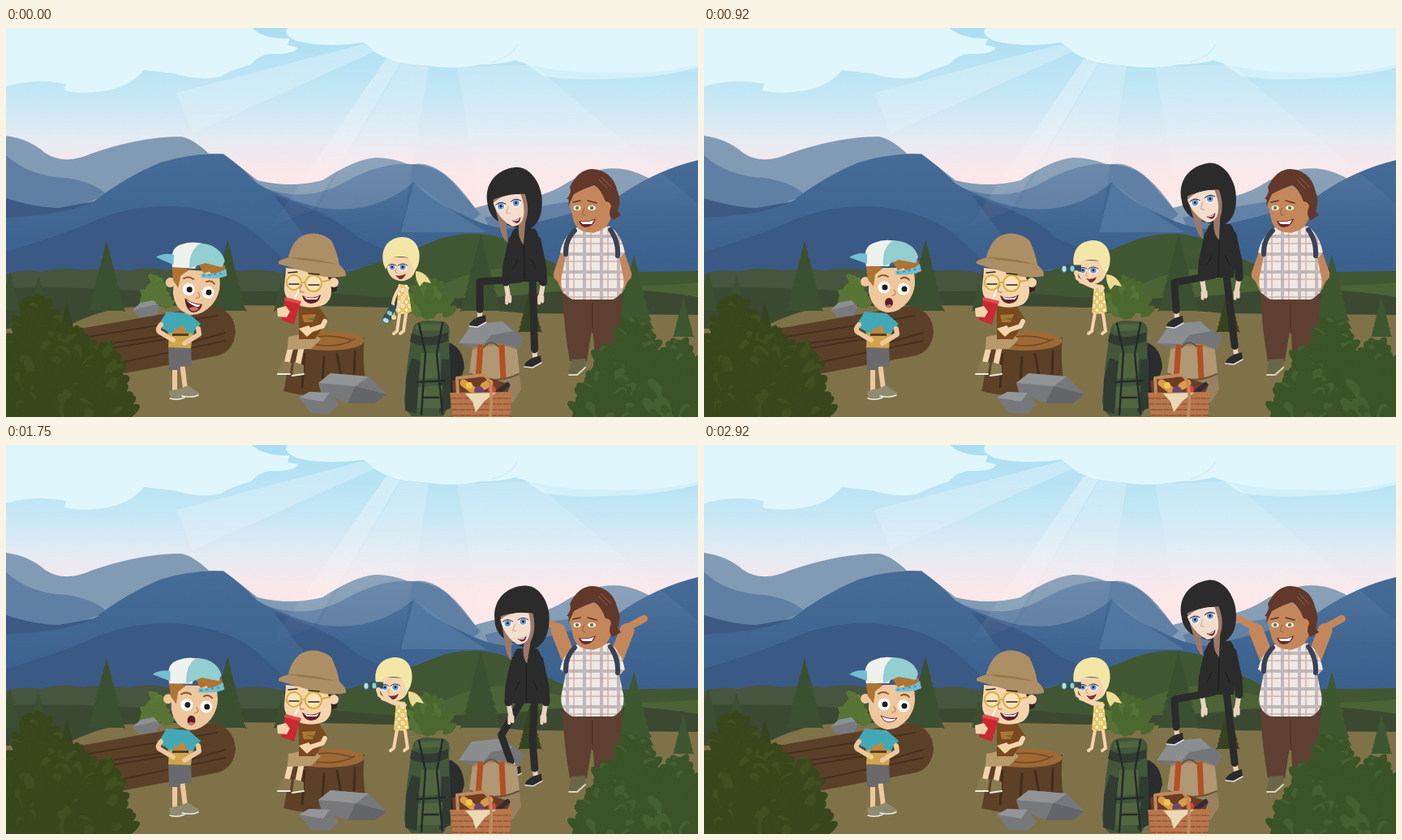
Animation, 853 px wide and 480 px high, one loop 3000 ms. Source, as an HTML page:

```html
<!DOCTYPE html>
<html lang="en">
<head>
<meta charset="utf-8">
<title>Mountain picnic</title>
<style>
html,body{margin:0;width:100%;height:100%;overflow:hidden;background:#7f7249}
svg{display:block;width:100vw;height:100vh}
.l{fill:none;stroke-linecap:round;stroke-linejoin:round}
.skin{fill:#f5d4ad}.sk{stroke:#f5d4ad}
#boy .skin{fill:#efc79d}#boy .sk{stroke:#efc79d}
.pale{fill:#f3ddcd}.pk{stroke:#ecd2c0}
.tan{fill:#c4875c}.tk{stroke:#c4875c}
.black{fill:#2b2b2c}.blk{stroke:#2b2b2c}
.w{fill:#fff}.d{fill:#1d1a1a}
</style>
</head>
<body>
<svg viewBox="0 0 853 480" preserveAspectRatio="none">
<defs>
<linearGradient id="sky" x2="0" y2="1"><stop stop-color="#aadef3"/><stop offset=".3" stop-color="#c4e7f5"/><stop offset=".5" stop-color="#e4ebf4"/><stop offset=".63" stop-color="#f7e8ec"/><stop offset=".72" stop-color="#fee7e7"/></linearGradient>
<linearGradient id="ray" gradientUnits="userSpaceOnUse" x1="0" x2="0" y1="20" y2="250"><stop stop-color="#fff" stop-opacity=".42"/><stop offset=".45" stop-color="#fff" stop-opacity=".2"/><stop offset="1" stop-color="#fff" stop-opacity="0"/></linearGradient>
<linearGradient id="hill" x2="0" y2="1"><stop stop-color="#456c97"/><stop offset="1" stop-color="#3b5f8c"/></linearGradient>
<pattern id="plaid" width="21" height="22" x="684" y="248" patternUnits="userSpaceOnUse">
<path d="M0 0H21V22H0Z" fill="#efe8e4"/><path d="M8 0V22M0 9H21" stroke="#9d8f96" stroke-width="4" opacity=".55"/><path d="M16 0V22M0 18H21" stroke="#c59a94" stroke-width="1.500" opacity=".7"/></pattern>
<pattern id="daisy" width="9" height="10" patternUnits="userSpaceOnUse"><path d="M0 0H9V10H0Z" fill="#e9c660"/><circle cx="3" cy="3" r="2.300" fill="#fff8e4"/><circle cx="7.500" cy="8" r="1.800" fill="#fff8e4"/><circle cx="3" cy="3" r=".8" fill="#c07a35"/></pattern>
<g id="eye"><circle class="w" r="7.500"/><circle class="d" cx="1" r="3.500"/></g>
<g id="blue"><ellipse class="w" rx="5.500" ry="5"/><circle r="4" fill="#6f9bd8"/><circle class="d" r="1.500"/><path d="M-6-2Q0-7 6-2" class="l" stroke="#332b2b"/></g>
<g id="sole"><path class="black" d="M7-8L-3-5Q-14 1-13 6L-3 7 8 1Z"/><path d="M-13 6L-3 7 8 1" class="l" stroke="#e4e1de" stroke-width="1.500"/></g>
</defs>

<path fill="url(#sky)" d="M0 0H853V270H0Z"/>
<path fill="#d2f0fa" d="M640 44L853 36V49Q800 62 760 62 700 66 662 59Z"/>
<path fill="#e0f6fd" d="M0 0H303Q318 14 350 13L347 21 360 24Q356 33 326 32 312 33 302 45 280 51 264 60 240 66 207 56L170 52Q152 74 118 78 92 82 72 77L74 69Q38 61 0 72Z"/>
<path fill="#e0f6fd" d="M347 0H853V45Q810 57 750 55 680 57 628 40 610 45 585 45 548 52 515 46 470 43 453 28L440 18Q395 25 358 16 340 8 347 0Z"/>
<path class="l" stroke="#d0edf8" stroke-width="1.500" d="M600 42Q626 34 630 20"/>

<path fill="#829bb4" d="M0 133Q29 137 48 154 72 170 105 155 165 134 216 134 231 137 250 155H268L310 188Q350 198 390 188 430 162 455 160 477 160 498 169 534 158 578 222L600 216Q660 212 690 192 748 156 798 189L853 220V300H0Z"/>
<path fill="#5f7fa4" d="M0 157Q28 183 75 185 108 190 125 206L60 230H0ZM320 198Q372 216 418 190 462 165 500 168 533 170 550 190L585 230 560 250H390ZM590 234Q650 220 705 213 738 210 760 217L680 255H600Z"/>
<path fill="#3c5a84" d="M0 210Q38 222 65 222L120 212 100 250H0Z"/>
<path fill="url(#hill)" d="M0 234Q80 230 110 213 145 185 190 166 232 153 268 156 288 169 310 192 342 211 388 222 431 228 466 213 487 204 503 190 521 212 560 229 590 245 618 248 706 229 752 210 799 176 853 163V315H0Z"/>
<path fill="#3b5985" d="M0 276Q55 260 100 242 150 218 208 220 268 224 307 253L350 292V310H0ZM330 206Q405 230 433 258L500 290 400 300Z"/>
<g fill="url(#ray)"><path d="M440 20L455 29 230 130 210 80Z" opacity=".7"/><path d="M468 39L488 40 378 225 326 246Z"/><path d="M488 41L521 48 487 255 380 230Z" opacity=".6"/><path d="M556 48L650 45 880 240 592 252Z" opacity=".5"/></g>
<path fill="#7fa3c8" opacity=".25" d="M503 190L545 222 592 252H487Z"/>

<path fill="#46553e" d="M0 304Q20 297 42 301 70 293 95 299 130 295 150 300 170 293 200 299 250 293 288 300 326 296 350 306L425 300 853 307V355H0Z"/>
<path fill="#415733" d="M420 302Q485 281 530 262 572 247 612 259 655 281 700 302L853 300V355H400Z"/>
<path fill="#4b6335" d="M498 340Q585 281 655 303 744 325 853 314V355H498Z"/>
<path fill="#3c4932" d="M0 321Q110 318 230 329 340 319 455 332 590 337 665 326 770 317 853 332V374H0Z"/>
<path fill="#7f7249" d="M0 371H70Q115 346 160 344 300 340 470 345 550 343 640 352L853 354V480H0Z"/>
<g id="trees"></g>

<path fill="#777b7e" d="M156 348L166 339 182 336 190 344 185 355 164 357Z"/><path fill="#8c9092" d="M156 348L166 339 182 336 186 341Z"/>
<path fill="#5b4028" d="M74 374L250 343Q281 345 283 375 281 398 262 404L120 431 80 410Z"/>
<path class="l" stroke="#472f1e" stroke-width="2" d="M95 382L260 355M130 389L214 377M106 399L196 384M135 414L270 386M215 392L270 376"/>

<g id="boy">
<path class="l sk" stroke-width="6" d="M208 414V447M217 414L221 445"/>
<path fill="#8f8a70" d="M201 448L213 445 220 455 212 459Q201 459 201 448ZM213 446L224 441 238 450Q239 454 229 455L217 454Z"/>
<path class="l" stroke="#eee" stroke-width="1.500" d="M202 457Q211 460 220 456M217 454Q229 457 237 453"/>
<path fill="#6a6a6c" d="M200 391L228 392 229 417 215 418 214 422 201 422Z"/>
<path fill="#43a8b5" d="M198 350L225 352 240 365 232 374 230 385H201L199 374 187 368Z"/>
<path fill="#d0a54a" d="M201 376L230 377 228 395 200 394Z"/><path fill="#c38735" d="M207 371H214L218 366 224 377H207Z"/><path fill="#4d4034" d="M205 377H225V380H205Z"/>
<path class="l sk" stroke-width="6" d="M191 366Q186 371 189 375L206 385M237 371L238 378 220 389"/>
<g id="boyHead">
<circle class="skin" cx="199" cy="313" r="6"/>
<path class="skin" d="M203 296H257Q265 319 252 337 240 352 225 351 207 347 203 326Z"/>
<path fill="#ad7433" d="M199 290L221 296 211 304 209 319 202 310ZM230 285L264 287Q268 295 259 301L257 296 250 302 246 296 239 299Z"/>
<path fill="#eef1ed" d="M200 294Q194 270 210 265 224 259 241 264L228 294Z"/>
<path fill="#93ced0" d="M221 294Q219 271 233 262 258 263 264 282L261 290 240 286Z"/>
<path fill="#73bed2" d="M179 283Q190 276 201 279V291ZM236 299Q255 301 266 291L268 300Q257 306 236 304Z"/>
<path d="M238 302L266 297" stroke="#3f95b5" stroke-dasharray="3 4" stroke-width="2"/>
<use href="#eye" x="222" y="320"/><use href="#eye" x="246" y="322"/>
<path class="l" stroke="#8a5a2d" stroke-width="2" d="M215 307Q221 303 227 307M243 309Q249 306 253 311"/>
<path class="l" stroke="#c98f62" stroke-width="1.500" d="M234 323Q239 329 232 330"/>
<g id="mouth"></g>
</g></g>

<g id="sitter">
<path fill="#5c4126" d="M349 386L442 382Q439 405 443 434 421 449 401 446 382 459 342 448 348 425 349 386Z"/>
<path class="l" stroke="#432d1c" stroke-width="3" d="M368 402L365 443M392 406L390 438M408 402L414 435M430 399L429 430"/>
<ellipse cx="396" cy="386" rx="46" ry="12" fill="#9d6936"/><path class="l" stroke="#75481f" stroke-width="1.500" d="M367 384Q399 376 426 385M383 391Q410 395 430 384"/>
<path class="l sk" stroke-width="7" d="M352 390L346 414M365 390L360 414"/>
<path fill="#8b7b51" d="M341 411L352 413 350 426 334 427ZM355 412L367 416 367 426 353 429Z"/><path class="l" stroke="#f0eee0" stroke-width="2" d="M335 427L350 427M353 429L367 427"/>
<path fill="#b99a6c" d="M348 381L378 375 388 384 376 396 347 397Z"/>
<path fill="#79491f" d="M361 344L386 344 397 361 390 370 381 384H361Z"/><path fill="#b27430" d="M365 354L382 353 378 363H367Z"/><path fill="#5e7135" d="M369 358L381 358 378 361Z"/>
<path class="l sk" stroke-width="6" d="M393 362L390 368 371 374"/><path class="skin" d="M361 371L373 367 379 374 371 381Z"/>
<path fill="#35241c" d="M344 298L409 302 408 324 400 327 343 308Z"/><circle class="skin" cx="404" cy="314" r="6"/>
<path class="skin" d="M345 296L395 302 400 316Q404 333 393 341 374 349 357 340 343 336 343 321Z"/>
<path fill="#ad8f66" d="M347 286Q353 260 369 255 386 250 401 262 409 278 411 293Z"/><path fill="#98794f" d="M348 283Q380 282 411 293L409 298Q380 293 348 287Z"/>
<path fill="#ad8f66" d="M336 288Q348 280 361 286L411 292Q420 300 419 306 395 311 370 301L336 291Z"/>
<g fill="#f8e2bc" stroke="#d5b038" stroke-width="2"><circle cx="355" cy="314" r="9"/><circle cx="379" cy="315" r="10"/><path d="M365 314H369M389 313L400 311"/></g>
<path class="l" stroke="#33231c" stroke-width="1.500" d="M349 316H361M373 317H386M348 302L359 301M373 303L386 304"/>
<path class="l" stroke="#c99261" stroke-width="1.500" d="M365 317Q358 326 367 326"/>
<path d="M365 330Q376 336 388 329 386 341 375 340 367 339 365 330Z" fill="#62202a"/><path class="w" d="M367 331Q377 336 386 331L383 335H371Z"/>
<path class="l" stroke="#f5f2ee" stroke-width="2" d="M354 338L361 323"/><path fill="#c92931" d="M344 333L363 338 355 366 339 360Z"/><path fill="#e04a4d" d="M344 332L364 337 363 341 343 336Z"/>
<path class="skin" d="M334 346L345 343 350 350 346 357 335 356Z"/>
</g>
<path fill="#77787b" d="M385 438L400 426 447 430 469 452 455 463 421 463 388 449Z"/><path fill="#929396" d="M385 438L400 426 447 430 431 442Z"/><path fill="#646568" d="M421 463L431 442 469 452 455 463Z"/>
<path fill="#77787b" d="M361 456L374 449 399 450 410 465 399 476 376 475Z"/><path fill="#949598" d="M361 456L374 449 399 450 391 461Z"/>

<g id="girl"></g>

<g id="man">
<g id="arm"><path id="upper" class="l tk" stroke-width="18"/><path id="lower" class="l tk" stroke-width="9"/></g><use href="#arm" transform="translate(1446) scale(-1 1)"/>
<path fill="#5d4031" d="M686 328L760 328Q757 378 750 410H726L723 367 716 411H695Q688 373 686 328Z"/><path class="l" stroke="#4b3227" stroke-width="1.500" d="M723 340V376"/>
<path fill="#6b6648" d="M697 409L714 408Q717 419 704 428L693 428Q694 420 697 409Z"/><path class="l" stroke="#ddd6be" stroke-width="2" d="M694 428H704L714 419"/>
<path class="tan" d="M705 236H741V255L722 263 704 252Z"/>
<path fill="url(#plaid)" d="M704 246L724 253 743 244Q758 253 763 277L756 284 761 308Q764 328 748 335H699Q681 328 685 306L690 282 683 277Q687 256 704 246Z"/>
<path class="l" stroke="#394253" stroke-width="6" d="M701 250Q689 262 690 279M745 249Q755 263 754 281"/>
<path class="tan" d="M696 202Q718 188 746 203L747 230Q742 250 724 252 706 254 700 239L695 219Z"/>
<path fill="#61382a" d="M693 220Q695 209 691 211 698 203 695 196 706 174 723 174 747 176 753 199 759 213 754 226L758 231 748 237Q741 231 746 220 745 214 739 214 733 198 725 194 710 199 700 205Z"/>
<path class="l" stroke="#9a6348" d="M731 187L741 198M734 184L746 196"/>
<g class="w"><ellipse cx="704" cy="222" rx="4.500" ry="3"/><ellipse cx="722" cy="222" rx="5" ry="3"/></g><g fill="#648044"><circle cx="704" cy="222" r="2.300"/><circle cx="722" cy="222" r="2.300"/></g>
<path class="l" stroke="#5b3222" stroke-width="1.500" d="M699 215L708 213M717 213L728 216"/>
<path class="l" stroke="#955b37" d="M713 222Q707 231 714 231"/>
<path d="M706 238Q718 240 727 235 724 246 714 246 708 245 706 238Z" fill="#65262c"/><path class="w" d="M708 239Q718 240 725 237L722 242H711Z"/>
</g>

<path fill="#737679" d="M558 389L574 366 612 362 639 382 632 397 598 403Z"/><path fill="#8b8e91" d="M558 389L574 366 612 362 625 374 598 379 589 390Z"/>
<g id="woman"></g>

<g id="bags">
<path fill="#292d2d" d="M544 388Q563 392 565 419L556 449 544 455Z"/>
<path fill="#42563a" d="M501 375Q501 361 519 361L539 362Q549 365 546 381L548 462 539 479H500Q488 469 492 449 494 411 501 375Z"/>
<path fill="#303b32" d="M500 376Q518 387 545 375V386Q518 398 498 387ZM493 432L500 407 511 411 506 476 492 472ZM537 409H548V469L534 475Z"/>
<path fill="#50653f" d="M505 366L540 365 538 373 505 374ZM512 401H535V431L509 433ZM508 443L538 441 536 469H507Z"/>
<path class="l" stroke="#242b28" stroke-width="2.500" d="M509 365L517 401 512 477M538 364L531 402 538 476M507 437L541 435M514 456H533"/>
<path fill="#99815f" d="M575 394Q603 384 629 395L635 446 625 462 578 459 570 444Z"/><path fill="#b09874" d="M575 397Q605 387 630 397L633 426Q602 440 571 425Z"/>
<path stroke="#b44f24" stroke-width="7" d="M585 391L582 434M611 391L613 434"/><path class="l" stroke="#6a5641" stroke-width="2" d="M589 394Q597 383 607 393M573 427Q602 441 632 427"/>
<path fill="#6d3c25" d="M550 435L589 430 622 440 617 453H552Z"/>
<path class="l" stroke="#dc9c45" stroke-width="9" d="M564 438L576 447M589 442L596 438"/><circle cx="571" cy="441" r="4" fill="#efc74c"/><circle cx="583" cy="448" r="6" fill="#69476d"/><circle cx="599" cy="446" r="5" fill="#cb493b"/><path class="l" stroke="#362b35" stroke-width="6" d="M607 449L618 440"/>
<path fill="#b8774b" d="M547 450L624 449 621 480H551Z"/><path class="l" stroke="#935638" stroke-width="1.500" stroke-dasharray="6 2" d="M549 457H622M549 464H622M551 471H621M551 478H621"/>
<path fill="#ead9b5" d="M566 451L604 450 590 460 579 474 575 461Z"/><path class="l" stroke="#c18a5d" stroke-width="4" d="M557 450L556 432 588 428Q602 432 597 479"/>
</g>
<g id="bushes"></g>
</svg>
<script>
const $ = id => document.getElementById(id);
let seed = 7;
const rnd = () => (seed = seed * 16807 % 2147483647) / 2147483647;
const mix = (a, b, u) => a + (b - a) * u;
const ease = (n, from, to) => {
  const u = Math.min(1, Math.max(0, (n - from) / (to - from)));
  return u * u * (3 - 2 * u);
};
const line = (d, cls, w) => `<path class="l ${cls}" stroke-width="${w}" d="${d}"/>`;
const put = (x, y, r, body) => `<g transform="translate(${x} ${y}) rotate(${r})">${body}</g>`;

// Fir with a serrated edge
function fir(x, top, base, color) {
  const h = base - top, w = h * .27;
  let right = '', left = '';
  for (let u = .1; u < 1.01; u += .1) {
    const y = top + h * u;
    right += `L${x + w * u} ${y}L${x + w * u * .86} ${y - 1}`;
    left = `L${x - w * u * .86} ${y - 1}L${x - w * u} ${y}` + left;
  }
  return `<path fill="${color}" d="M${x} ${top}${right}${left}Z"/>`;
}

// Cone of upturned leaves, widening from the tip to the base
function shrub(x, top, base, w, size, color, glow) {
  let s = '';
  const count = Math.round(w * (base - top) / size / 4);
  for (let i = 0; i < count; i++) {
    const v = i / count, side = rnd() * 2 - 1;
    const lx = x + side * w * v ** .6, ly = top + size + (base - top - size) * v;
    s += put(lx, ly, side * 60 - 90, `<ellipse rx="${size * (.8 + rnd() * .5)}" ry="${size * .5}" fill="${rnd() < .15 ? glow : color}"/>`);
  }
  const body = `M${x} ${top + size}Q${x + w * .8} ${mix(top, base, .4)} ${x + w} ${base}H${x - w}Q${x - w * .8} ${mix(top, base, .4)} ${x} ${top + size}Z`;
  return `<path fill="${color}" d="${body}"/>` + s;
}

const firs = (color, base, ...spots) => spots.map(([x, top]) => fir(x, top, base, color)).join('');
$('trees').innerHTML =
  firs('#3b5030', 350, [124, 263], [273, 261], [40, 305], [5, 300], [339, 315], [585, 254]) +
  firs('#35431f', 376, [75, 338], [646, 320]) + firs('#3d5730', 382, [774, 280], [835, 332]) +
  shrub(184, 302, 342, 20, 8, '#587536', '#658540') + shrub(521, 304, 352, 30, 10, '#4b682f', '#547336');

const hedge = (color, glow, ...spots) => spots.map(([x, top, w]) => shrub(x, top, 490, w, 13, color, glow)).join('');
$('bushes').innerHTML =
  hedge('#39471c', '#414f20', [38, 328, 70], [84, 368, 55], [122, 384, 34]) +
  hedge('#3a5428', '#426030', [772, 354, 60], [738, 392, 42], [830, 382, 64]);

// The cycle runs through four stances: head, head turn, hip, left and right foot
const stance = (head, turn, hip, left, right) => [...head, turn, ...hip, ...left, ...right];
const lean = stance([627, 210], -6, [640, 310], [584, 362], [652, 412]);
const rock = stance([590, 165], 0, [596, 269], [584, 367], [608, 367]);
const low = stance([622, 205], -8, [635, 305], [583, 363], [656, 408]);
const ground = stance([638, 212], 0, [643, 317], [635, 412], [653, 414]);
const moves = [[0, 5, rock], [8, 11, low], [11, 14, ground], [20, 24, lean]];

const hood = `
<path class="black" d="M-34 3C-36-22-18-38 5-38 25-37 36-11 33 9 31 27 24 37 10 42L-21 28Q-34 19-34 3Z"/>
<path fill="#9c7867" d="M-27-3L13-5Q18 16 10 31L5 58Q-2 50 2 31H-14L-14 54Q-21 49-22 31Z"/>
<path class="pale" d="M-27 3Q-12-8 8-4 13 17 6 29 0 36-7 34-23 23-27 3Z"/>
<path class="black" d="M-32 1Q-8-9 18-3L15-15-27-13Z"/>
<use href="#blue" x="-18" y="8"/><use href="#blue" x="1" y="6"/>
<path class="l" stroke="#cda38f" d="M-9 9L-12 17-8 18"/>
<path fill="#7a2732" d="M-7 27Q-2 28 5 24 4 31-1 31Z"/><path class="w" d="M-5 27Q-1 28 4 25L1 28H-4Z"/>`;

// Two bones of one length; the knee points forward
function leg(hx, hy, fx, fy) {
  const bone = 49, dx = fx - hx, dy = fy - hy, d = Math.hypot(dx, dy);
  const out = Math.sqrt(Math.max(0, bone * bone - d * d / 4)) / d;
  const kx = hx + dx / 2 - dy * out, ky = hy + dy / 2 + dx * out;
  const ax = mix(kx, fx, .7), ay = mix(ky, fy, .7);
  return line(`M${ax} ${ay}L${fx} ${fy - 6}`, 'pk', 6) +
    line(`M${hx} ${hy}L${kx} ${ky}L${ax} ${ay}`, 'blk', 9) + put(fx, fy, 0, '<use href="#sole"/>');
}
function sleeve(x, y, side) {
  const hand = x + side * 20, wrist = x + side * 23;
  return line(`M${wrist} ${y + 66}L${hand} ${y + 84}`, 'pk', 6) +
    line(`M${hand - 2} ${y + 84}V${y + 92}M${hand + 2} ${y + 84}V${y + 90}`, 'pk', 4) +
    line(`M${x + side * 15} ${y + 14}L${x + side * 22} ${y + 47}L${wrist} ${y + 66}`, 'blk', 10);
}
function woman(n) {
  const pose = moves.reduce((p, [from, to, next]) => p.map((v, i) => mix(v, next[i], ease(n % 24, from, to))), lean);
  const [hx, hy, turn, px, py, lx, ly, rx, ry] = pose;
  const nx = hx + 5 - turn * 1.2, ny = hy + 40 + turn * .4;
  const torso = `M${nx - 12} ${ny}H${nx + 12}Q${nx + 22} ${ny + 8} ${px + 19} ${py - 10}L${px + 18} ${py + 3}H${px - 18}L${px - 19} ${py - 10}Q${nx - 22} ${ny + 8} ${nx - 12} ${ny}Z`;
  return leg(px + 9, py, rx, ry) + leg(px - 7, py, lx, ly) +
    `<path class="black" d="${torso}"/>` +
    `<path class="l" stroke="#1b1b1d" d="M${nx - 1} ${ny + 5}L${px - 1} ${py}M${px - 15} ${py - 13}l6 -11M${px + 13} ${py - 12}l-5 -12"/>` +
    sleeve(nx, ny, -1) + sleeve(nx, ny, 1) + put(hx, hy, turn, hood);
}

const curls = `
<path fill="#eddb91" d="M18 14Q30 14 37 29L28 27 23 33Q17 24 18 14Z"/>
<path class="skin" d="M-18-4L17-2Q21 14 12 22 1 30-10 23-20 15-18-4Z"/>
<path fill="#f4e6a7" d="M-22 4C-26-20-10-28 2-28 20-28 27-8 20 9L15 17Q15 4 8-3-6-6-14-1L-19 12Z"/>
<use href="#blue" transform="translate(-11 9) scale(.85)"/><use href="#blue" transform="translate(2 9) scale(.95)"/>
<path class="l" stroke="#c8935d" d="M-6 11Q-9 16-5 16"/>
<path fill="#7a2d30" d="M-7 19Q0 21 6 17 3 25-2 24Z"/>`;
const glasses = `
<path fill="#354f55" d="M-10-5L11-4V4L-9 5Z"/>
<ellipse cx="-10" rx="3" ry="4" fill="#b9e1e5" stroke="#3c777f"/><ellipse rx="3" ry="4" fill="#95ced5" stroke="#31646d"/>`;
function girl(n) {
  const u = ease(n, 1, 10.5);
  const hx = mix(487, 478, u), hy = mix(286, 290, u), x = mix(490, 487, u);
  const bx = mix(473, 454, u) - 8 * Math.sin(Math.PI * u), by = mix(352, 297, u);
  const ax = bx + mix(4, 6, u), ay = by + mix(-9, 12, u);
  const foot = (fx, hip) => line(`M${hip} 346L${fx} 374l-4 3`, 'sk', 4);
  return foot(mix(482, 478, u), x - 4) + foot(mix(490, 495, u), x + 4) +
    `<path fill="url(#daisy)" d="M${x - 6} 316L${x + 5} 317 ${x + 10} 350Q${x} 355 ${x - 9} 351Z"/>` +
    line(`M${x + 5} 321Q${x} ${(330 + ay) / 2} ${ax + 4} ${ay + 4}`, 'sk', 4) +
    put(hx, hy, 0, curls) +
    line(`M${x - 5} 320Q${x - 14} ${(328 + ay) / 2} ${ax} ${ay}L${bx + 4} ${by + 4}`, 'sk', 4) +
    put(bx, by, mix(-62, -2, u), glasses) + `<circle class="skin" cx="${bx + 5}" cy="${by + 5}" r="3"/>`;
}

// Arms swing outwards from behind the back to a shrug
function man(n) {
  const u = ease(n, 11, 15), a = mix(75, -70, u) * Math.PI / 180, b = mix(115, -28, u) * Math.PI / 180;
  const ex = 752 + 44 * Math.cos(a), ey = 266 + 44 * Math.sin(a);
  const hx = ex + 22 * Math.cos(b), hy = ey + 22 * Math.sin(b);
  $('upper').setAttribute('d', `M750 269L${mix(752, ex, .9)} ${mix(266, ey, .9)}`);
  $('lower').setAttribute('d', `M${ex} ${ey}L${hx} ${hy}`);
}

const mouths = {
  O: '<path fill="#5b2026" d="M218 331Q229 338 240 337 238 348 229 348 220 346 218 331Z"/><path class="w" d="M220 333Q230 338 238 338L235 341Q225 339 220 333Z"/><path fill="#d46b69" d="M224 343Q231 339 236 343 230 350 224 343Z"/>',
  R: '<ellipse cx="228" cy="339" rx="5" ry="6" fill="#5b2026"/><path fill="#d46b69" d="M224 343Q229 339 232 343 228 348 224 343Z"/>',
  G: '<path fill="#fff" stroke="#713039" d="M218 334Q228 339 238 337 231 345 222 340Z"/>',
  S: '<path class="l" stroke="#713039" stroke-width="1.500" d="M219 335Q227 342 236 338"/>'
};
const speech = 'OOGSSGROOSGRRGO';
function boy(n) {
  const k = 1 - ease(n, 7, 10) + ease(n, 20, 23) - ease(n, 25, 28);
  $('boyHead').setAttribute('transform', `translate(${k} ${k * 2}) rotate(${k * 4} 215 352)`);
  $('mouth').innerHTML = mouths[speech[n % speech.length]];
}

let last = -1;
function draw(now) {
  const n = Math.floor((now % 3000 + 4) * .012) % 36;
  if (n !== last) {
    last = n;
    boy(n);
    man(n);
    $('girl').innerHTML = girl(n);
    $('woman').innerHTML = woman(n);
  }
  requestAnimationFrame(draw);
}
draw(0);
</script>
</body>
</html>
```
